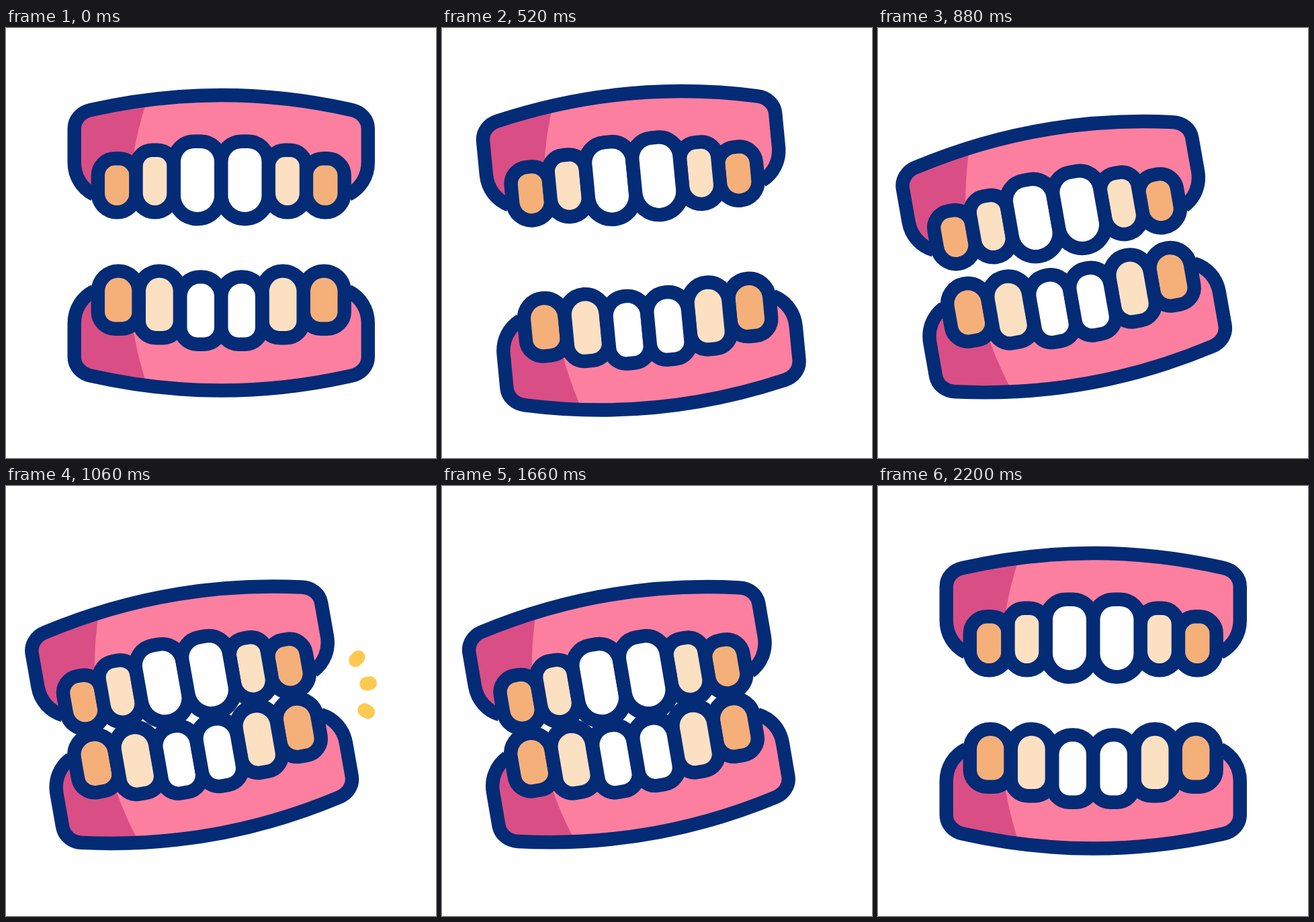
An HTML page for the animation above (2.4 s loop, 640 by 640 pixels).

```html
<!DOCTYPE html>
<html lang="en">
<head>
<meta charset="utf-8">
<title>Chattering teeth</title>
<style>
html, body { margin: 0; width: 100%; height: 100%; overflow: hidden; background: #fff; }
svg { display: block; width: 100%; height: 100%; }
.line { fill: none; stroke: #042b76; stroke-width: 20.4; stroke-linejoin: round; }
.tooth { stroke: #042b76; stroke-width: 40.8; paint-order: stroke; }
#sparks { stroke: #fec951; stroke-width: 20.4; stroke-linecap: round; }
</style>
</head>
<body>
<svg viewBox="0 0 640 640">
  <defs>
    <path id="outline" d="M131 248C113 239 101.7 221 101.7 200V150C101.7 136 112 125 126 122Q320.25 78 514.5 122C528.5 125 538.8 136 538.8 150V200C538.8 221 527.5 239 509.5 248"/>
    <g id="gum">
      <use href="#outline" fill="#fd7fa0"/>
      <path fill="#da4e86" d="M131 248C113 239 101.7 221 101.7 200V150C101.7 136 112 125 126 122Q168 112 210 107Q196 150 190 187V248Z"/>
      <use href="#outline" class="line"/>
    </g>
  </defs>
  <g id="jaws">
    <g id="upper"><use href="#gum"/></g>
    <g id="lower"><use href="#gum" transform="translate(0 639.5) scale(1 -1)"/></g>
  </g>
  <g id="sparks"></g>
</svg>
<script>
const NS = 'http://www.w3.org/2000/svg';
const $ = id => document.getElementById(id);

function add(parent, tag, attrs) {
  const el = document.createElementNS(NS, tag);
  for (const k in attrs) el.setAttribute(k, attrs[k]);
  return parent.appendChild(el);
}

// Rounded box with separate top and bottom radii
function toothPath(l, r, t, b, rt, rb) {
  return `M${l} ${t + rt}A${rt} ${rt} 0 0 1 ${l + rt} ${t}H${r - rt}A${rt} ${rt} 0 0 1 ${r} ${t + rt}` +
    `V${b - rb}A${rb} ${rb} 0 0 1 ${r - rb} ${b}H${l + rb}A${rb} ${rb} 0 0 1 ${l} ${b - rb}Z`;
}

// Each tooth: left, right, top, bottom, top radius, bottom radius
const ORANGE = '#f5b07a', CREAM = '#fce0c2', WHITE = '#fff';
const teeth = {
  upper: [
    [ORANGE, 147, 183.5, 204.5, 264, 15, 18],
    [CREAM, 203.7, 239.5, 192, 264, 14, 17.9],
    [WHITE, 260, 310, 179, 274, 20, 25]
  ],
  lower: [
    [ORANGE, 147, 187.5, 371.8, 437.5, 20, 15],
    [CREAM, 208, 248.7, 371.8, 451, 20, 15],
    [WHITE, 269.5, 310, 380.6, 460.5, 19, 15]
  ]
};
for (const id in teeth) {
  for (const side of ['', 'translate(640.5 0) scale(-1 1)']) {
    const half = add($(id), 'g', { transform: side });
    for (const [fill, ...box] of teeth[id])
      add(half, 'path', { class: 'tooth', fill, d: toothPath(...box) });
  }
}

const sparks = [
  [520.3, 259.3, 560, 215],
  [536.5, 294.4, 587.6, 286],
  [533.5, 333.5, 586, 361.7]
].map(ends => ({ ends, el: add($('sparks'), 'line', {}) }));

const ease = u => u * u * (3 - 2 * u);

// Eased value at time t from [time, value] keys
function track(keys, t) {
  const i = keys.findIndex(k => k[0] > t);
  if (i < 0) return keys[keys.length - 1][1];
  if (!i) return keys[0][1];
  const [t0, a] = keys[i - 1], [t1, b] = keys[i];
  return a + (b - a) * ease((t - t0) / (t1 - t0));
}

const LOOP = 2400, STEP = 20;
const TILT = [[200, 0], [800, 1], [1600, 1], [2200, 0]];
const GAP = [[200, 0], [600, 16.3], [1000, -40.6], [1300, -24.4], [1600, -40.6], [2200, 0]];
const HEAD = [[1000, 0], [1300, 1]];
const TAIL = [[1300, 0], [1600, 1]];

function draw(t) {
  const p = track(TILT, t), gap = track(GAP, t);
  $('jaws').setAttribute('transform', `translate(${-43.5 * p} ${21 * p}) rotate(${-10 * p} 320 320)`);
  $('upper').setAttribute('transform', `translate(0 ${-gap})`);
  $('lower').setAttribute('transform', `translate(0 ${gap})`);

  const head = track(HEAD, t), tail = track(TAIL, t);
  $('sparks').style.display = head > tail ? '' : 'none';
  for (const { ends: [x1, y1, x2, y2], el } of sparks) {
    const put = (n, u) => {
      el.setAttribute('x' + n, x1 + (x2 - x1) * u);
      el.setAttribute('y' + n, y1 + (y2 - y1) * u);
    };
    put(1, tail);
    put(2, head);
  }
}

const start = performance.now();
function tick() {
  const t = (performance.now() - start) % LOOP;
  draw(Math.floor(t / STEP) * STEP);
  requestAnimationFrame(tick);
}
tick();
</script>
</body>
</html>
```
